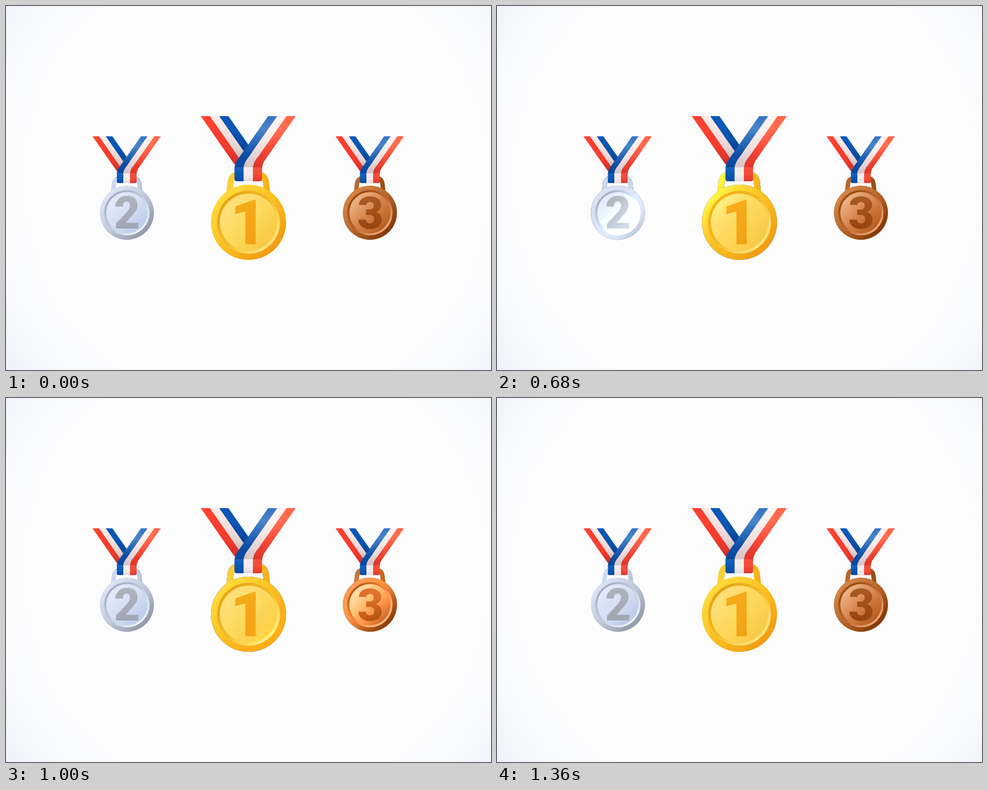
An HTML page with a canvas that plays this animation: 864x648 px, repeating every 1480 ms.

```html
<!DOCTYPE html>
<html lang="en">
<head>
<meta charset="utf-8">
<title>Medals</title>
<style>
html, body { margin: 0; width: 100%; height: 100%; overflow: hidden; background: #fcfcfd; }
canvas { display: block; }
</style>
</head>
<body>
<canvas id="stage" width="864" height="648"></canvas>
<script>
const W = 864, H = 648, LOOP = 1480, STEP = 40, SWEEP = 600;
const CX = 432, CY = 385; // medals are drawn at the size and place of the gold one
const STRIPE = 16.4;

const medals = [
  { digit: '2', x: 215.3, y: 368, scale: 0.72, start: 360, shift: 0,
    ring: ['#dce5f6', '#c0cadb', '#8f98a6'], groove: ['#a3adbf', '#c3ccdd', '#f0f4fc'],
    face: ['#e2eafa', '#d5dff3', '#bccaea'], handle: ['#c9d6ee', '#dbe5f7', '#b4c2dc'],
    ink: ['#adb3bb', '#a0a7b2'] },
  { digit: '1', x: CX, y: CY, scale: 1, start: 560, shift: -5,
    ring: ['#ffdb3d', '#fbc021', '#f09a12'], groove: ['#e6a213', '#f3bd2a', '#ffe681'],
    face: ['#fee07c', '#fcd95c', '#f8c944'], handle: ['#fcd033', '#fccb2b', '#f6ad16'],
    ink: ['#f5ab18', '#f3a115'] },
  { digit: '3', x: 648.3, y: 368, scale: 0.72, start: 760, shift: 0,
    ring: ['#d7864a', '#b5662a', '#813605'], groove: ['#96480f', '#b9652d', '#f0a978'],
    face: ['#efb48a', '#d58448', '#b65d22'], handle: ['#b8682d', '#b3652d', '#96490f'],
    ink: ['#aa5a24', '#974510'] }
];

const makeCanvas = () => Object.assign(document.createElement('canvas'), { width: W, height: H });
const stage = document.getElementById('stage').getContext('2d');
const buffer = makeCanvas(), layer = buffer.getContext('2d');

function shade(c, x0, y0, x1, y1, colors) {
  const g = c.createLinearGradient(x0, y0, x1, y1);
  colors.forEach((color, i) => g.addColorStop(i / (colors.length - 1), color));
  return g;
}

function disc(c, r, colors) {
  const d = r * 0.72;
  c.fillStyle = shade(c, CX - d, CY - d, CX + d, CY + d, colors);
  c.beginPath();
  c.arc(CX, CY, r, 0, 7);
  c.fill();
}

function drawHandle(c, colors) {
  c.strokeStyle = shade(c, 392, 0, 471, 0, colors);
  c.lineWidth = 11;
  c.stroke(new Path2D('M397.5 336L400 314Q402 300 414.5 300H448.5Q461 300 463 314L465.5 336'));
}

function drawRibbon(c) {
  const back = [['#ff4331', '#fb3e2e', '#f4392b', '#c9322b'], ['#fbeae7', '#f5e3e0', '#e8d3d2', '#b9a0a4'], ['#0b58b8', '#0a55b3', '#08469a', '#07306f']];
  back.forEach((colors, i) => {
    const x = 347 + STRIPE * i;
    c.fillStyle = shade(c, 0, 196, 0, 282, colors);
    c.fill(new Path2D(`M${x} 196h${STRIPE}l60 86h${-STRIPE}Z`));
  });

  const front = [['#3673c2', '#4b86ca', '#2a69b9', '#0c4ea5', '#0c4799'], ['#fff4f1', '#fbf1f0', '#f3e6e6', '#e4d4d5', '#d3c2c4'], ['#ff6545', '#ff6e52', '#fb5540', '#ee4030', '#dc3527']];
  front.forEach((colors, i) => {
    const x = 467 + STRIPE * i, foot = 407 + STRIPE * i, right = foot + STRIPE;
    c.fillStyle = shade(c, 0, 196, 0, 289, colors);
    c.fill(new Path2D(`M${x} 196L${x - 54} 273Q${foot} 281 ${foot} 290H${right}Q${right} 281 ${x - 54 + STRIPE} 273L${x + STRIPE} 196Z`));
  });

  const knot = [['#1c63bb', '#0b58b5', '#084a9f'], ['#f3eaeb', '#f6eeee', '#e3d7d9'], ['#f0503f', '#f64a38', '#dc382b']];
  c.save();
  c.beginPath();
  c.roundRect(407, 287, 49.2, 25, 4);
  c.clip();
  knot.forEach((colors, i) => {
    c.fillStyle = shade(c, 0, 287, 0, 312, colors);
    c.fillRect(407 + STRIPE * i, 287, STRIPE + 0.3, 25);
  });
  c.restore();
}

function drawDigit(c, { digit, shift, ink }) {
  c.font = '900 111px Roboto, sans-serif';
  const m = c.measureText(digit);
  const x = CX + shift + (m.actualBoundingBoxLeft - m.actualBoundingBoxRight) / 2;
  c.fillStyle = shade(c, 0, 345, 0, 424, ink);
  c.fillText(digit, x, 424);
}

function drawMetal(c, medal) {
  drawHandle(c, medal.handle);
  disc(c, 67, medal.ring);
  disc(c, 56, medal.groove);
  disc(c, 51, medal.face);
  drawDigit(c, medal);
}

function place(c, { x, y, scale }) {
  c.setTransform(scale, 0, 0, scale, x - CX * scale, y - CY * scale);
}

function prerender(medal, draw) {
  const canvas = makeCanvas(), c = canvas.getContext('2d');
  place(c, medal);
  draw(c, medal);
  return canvas;
}

// A soft diagonal band of light, slowing as it leaves at the lower right.
function drawSheen(c, p) {
  const center = -260 + 445 * (1 - (1 - p) ** 1.6), half = 118, k = Math.SQRT1_2;
  const at = d => [CX + d * k, CY + d * k];
  const g = c.createLinearGradient(...at(center - half), ...at(center + half));
  for (let i = 0; i <= 12; i++) {
    const v = Math.round(32 * (1 - Math.cos(i / 12 * 2 * Math.PI)));
    g.addColorStop(i / 12, `rgb(${v},${v},${v})`);
  }
  c.fillStyle = g;
  c.fillRect(CX - 110, CY - 200, 220, 280);
}

function drawBackground() {
  const g = stage.createRadialGradient(445, 310, 0, 445, 310, 565);
  g.addColorStop(0.72, '#fcfcfd');
  g.addColorStop(0.86, '#f8fafd');
  g.addColorStop(1, '#ebf0fb');
  stage.fillStyle = g;
  stage.fillRect(0, 0, W, H);
}

for (const medal of medals) {
  medal.metal = prerender(medal, drawMetal);
  medal.ribbon = prerender(medal, drawRibbon);
}

function drawShiningMetal(medal, p) {
  layer.globalCompositeOperation = 'copy';
  layer.drawImage(medal.metal, 0, 0);
  layer.globalCompositeOperation = 'color-dodge';
  place(layer, medal);
  drawSheen(layer, p);
  layer.setTransform(1, 0, 0, 1, 0, 0);
  layer.globalCompositeOperation = 'destination-in';
  layer.drawImage(medal.metal, 0, 0);
  stage.drawImage(buffer, 0, 0);
}

function render(now) {
  const t = Math.floor(now % LOOP / STEP) * STEP;
  drawBackground();
  for (const medal of medals) {
    const p = (t - medal.start) / SWEEP;
    if (p > 0 && p < 1) drawShiningMetal(medal, p);
    else stage.drawImage(medal.metal, 0, 0);
    stage.drawImage(medal.ribbon, 0, 0);
  }
}

const begin = performance.now();
function tick() {
  render(performance.now() - begin);
  requestAnimationFrame(tick);
}
tick();
</script>
</body>
</html>
```
